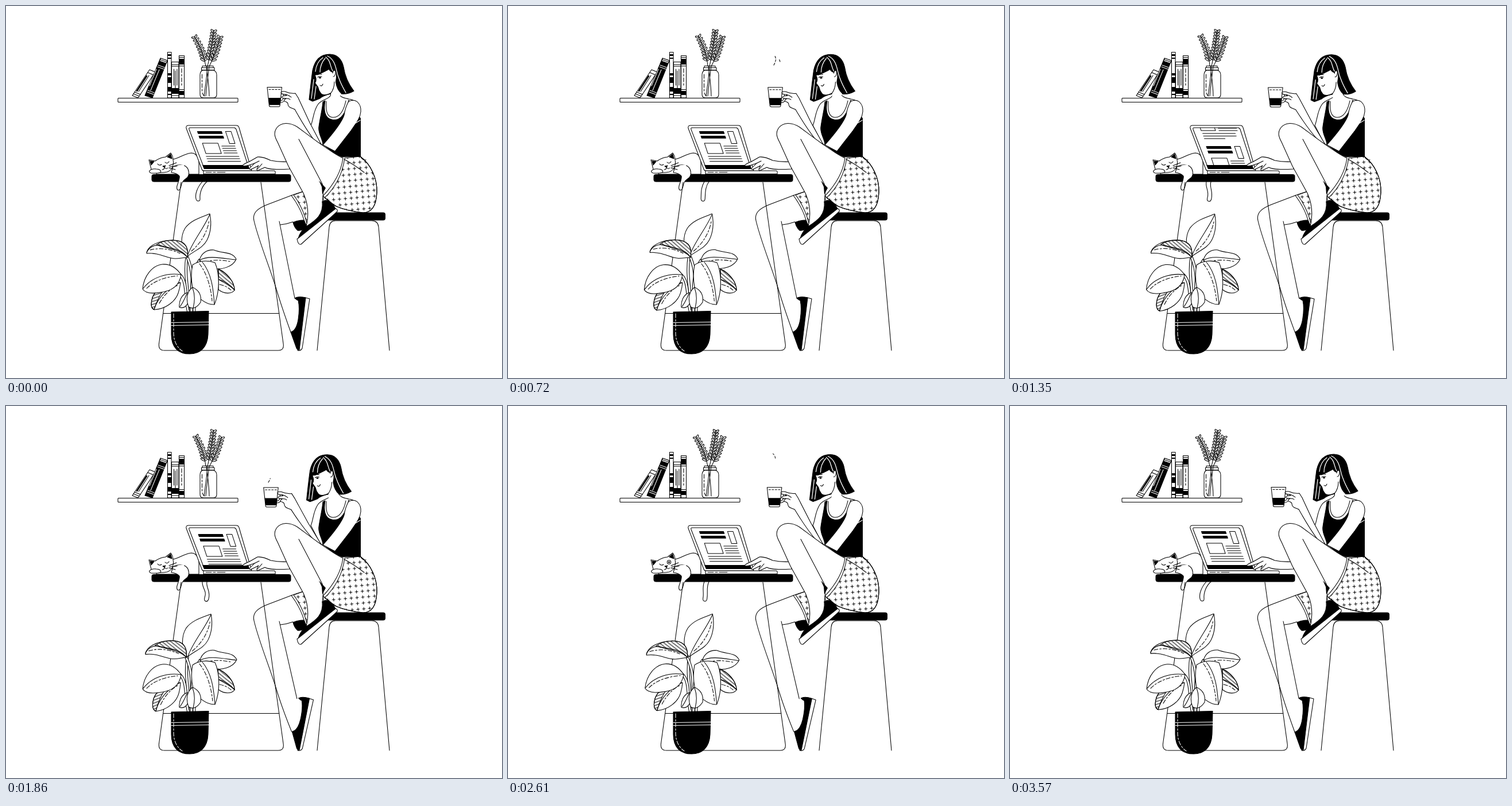
Write an HTML page that moves like this. It is 864 px wide and 648 px high and loops after 3.6 s.

```html
<!DOCTYPE html>
<html lang="en">
<head>
<meta charset="utf-8">
<title>At the desk</title>
<style>
html, body { margin: 0; width: 100%; height: 100%; overflow: hidden; background: #fff; }
svg { display: block; width: 864px; height: 648px; fill: none; stroke: #000; stroke-width: 1.05; stroke-linecap: round; stroke-linejoin: round; }
.w { fill: #fff; }
.k { fill: #000; }
.b { fill: #000; stroke: none; }
.wl { stroke: #fff; }
.dash { stroke-dasharray: 7 3 3 3; }
</style>
</head>
<body>
<svg viewBox="0 0 864 648">
<defs>
  <pattern id="plus" width="10.2" height="10.2" patternUnits="userSpaceOnUse" patternTransform="translate(4 3) rotate(-5)">
    <path d="M2.700 5.100h4.800M5.100 2.700v4.800"/>
  </pattern>
  <pattern id="hatch" width="4.8" height="4.8" patternUnits="userSpaceOnUse" patternTransform="rotate(-50)">
    <path d="M2 0v4.800" stroke-linecap="butt"/>
  </pattern>
  <pattern id="hatchDown" width="4.8" height="4.8" patternUnits="userSpaceOnUse" patternTransform="rotate(-50)">
    <path d="M2 0v4.800" stroke-linecap="butt"/>
  </pattern>
  <pattern id="hatchFlat" width="4.8" height="4.8" patternUnits="userSpaceOnUse" patternTransform="rotate(72)">
    <path d="M2 0v4.800" stroke-linecap="butt"/>
  </pattern>
  <clipPath id="screen"><path d="M319 212H399L421 277H342Z"/></clipPath>
</defs>

<!-- shelf and books -->
<rect class="w" x="195" y="160.500" width="209" height="7" rx="1"/>
<path class="w" d="M250 111L260 115 230 160 220 156Z"/>
<path d="M247 116L257 120M224 150L234 154M222 153L232 157M249 121L231 149"/>
<path d="M245 122L228 148" stroke-width="2.400"/>
<path class="k" d="M269 91L281 95 255 160 242 156Z"/>
<path class="w" d="M269.500 91L281 95 279 100 267.500 96Z"/>
<path d="M268.500 93.500L280 97.500"/>
<path class="wl" d="M265 103L276 107M264 106L275 110M267 111L252 147M262 110L250 139M247 147L258 151M246 150L257 154"/>
<rect class="w" x="281.500" y="80.500" width="6.500" height="79.500"/>
<path class="b" d="M281.500 84h6.500v3h-6.500zM281.500 90h6.500v2h-6.500zM281.500 117h6.500v4h-6.500zM281.500 124h6.500v10h-6.500zM281.500 141h6.500v8h-6.500zM281.500 153h6.500v2h-6.500z"/>
<rect class="w" x="288.500" y="97.500" width="12.500" height="62.500"/>
<path d="M289 102H301M289 105H301M292.500 110V138M295 113V143M298 110V138M289 156H301"/>
<path class="b" d="M289 143h12v10h-12z"/>
<rect class="w" x="301.500" y="86.500" width="9" height="73.500"/>
<path class="b" d="M301.500 92h9v10h-9zM301.500 148h9v7h-9z"/>
<path d="M301.500 89.500h9M301.500 104.500h9M301.500 145.500h9"/>
<path class="dash" d="M306 109V141"/>

<!-- jar with twigs -->
<path class="w" d="M342 112C339 114 338 117 338 120V154Q338 160 344 160H361Q367 160 367 154V120C367 116 366 114 362 112Z"/>
<path class="w" d="M342 104.500H361V107.500H342ZM340.500 107.500H363V111.500H340.500Z"/>
<path class="dash" d="M341.500 119V148Q342 155 346 157"/>
<path d="M349 104C351 122 354 140 354 157M351 104C350 122 347 142 345 157M354 104C352 122 349 142 348 157"/>
<g id="twigs"></g>

<!-- cat -->
<path class="w" d="M291 267C302 265 311 257 323 256Q332 256 336 268V293H262V286Z"/>
<path id="tail" class="w"/>
<rect class="b" x="253.500" y="293" width="243" height="13.500" rx="4"/>
<path class="w" d="M291 280C298 276 312 274 317 284C320 292 318 298 313 301C307 305 306 309 305 314C304 319 303 321 300 321C297 320 297 315 299 310C301 305 303 300 302 296Q297 291 288 290Z"/>
<path d="M294 281Q304 277 309 278" stroke="#fff" stroke-width="2.500"/>
<path class="w" d="M253 284C251 277 250 273 249 268L260 270Q268 264 278 263L287 256Q291 261 291 268C293 278 289 286 281 289Q266 292 255 288Z"/>
<path class="k" d="M251 270L258 271 253 277ZM281 263L287 258 289 266Z"/>
<path class="w" d="M262 284C268 284 271 287 269 290Q263 292 253 291Q249 290 250 287Q253 283 262 284Z"/>
<path class="k" d="M273 279L278 278 276 281Z"/>
<path d="M276 281Q276 285 272 285M276 281Q279 285 282 282M284 278L297 273M285 280L298 279M284 282L295 285M264 275Q267 279 271 276"/>
<path id="shut" d="M277 272Q281 276 284 271"/>
<g id="open"><circle class="w" cx="280.500" cy="272" r="3.200"/><circle class="b" cx="280.500" cy="272" r="1.600"/></g>

<!-- laptop -->
<path class="w" d="M318 208H401Q405 208 406 212L428 287H344Q342 287 341 284L314 213Q313 208 318 208Z"/>
<path class="w" d="M321 212H397Q400 212 401 215L423 282H345L319 215Q318 212 321 212Z"/>
<g clip-path="url(#screen)"><g transform="translate(-68.640 0) skewX(18.263)"><g id="page"></g></g></g>
<path class="b" d="M342 277H422L424 284H345Z"/>
<path class="w" d="M344 287H467Q469 287 469 289V292.500H344Z"/>
<path d="M348 289.700h10M361 289.700h4M368 289.700h14"/>

<!-- stool -->
<path d="M542 600L563 385Q564 374 574 374H637Q648 374 649 385L668 600"/>
<path class="b" d="M570 359.500H657Q661 359.500 661 363.500V369.500Q661 373.500 657 373.500H555Z"/>

<!-- torso and arms -->
<path class="w" d="M566 153C565 163 549 162 543 172C535 184 535 200 531 208L548 241H580L617 185C617 170 609 164 597 162C588 160 580 159 578 148Z"/>
<path id="forearm" class="w"/>
<path class="k" d="M552 167L556 165C553 181 555 196 568 198C583 201 592 186 597 164L617.500 196V263C605 270 593 266 574 258L552 241C551 230 543 222 545 210C547 195 551 180 552 167Z"/>
<path d="M558 166C557 180 558 193 569 194C582 195 589 180 592 165"/>
<path class="w" d="M597 166C611 160 619 172 618 184C617 196 609 205 601 217L573 253 552 242C567 225 585 203 589 190Q591 176 597 166Z"/>
<path class="wl" d="M609 204L617 199"/>
<path class="w" d="M494 271C480 272 470 271 461 269Q447 262 438 263L424 271Q414 275 412 278Q415 280 427 276L433 274 424 283Q424 286 428 284L440 278Q435 285 438 287L451 281Q458 286 494 284Z"/>
<path d="M446 275L438 284M441 270L433 274"/>
<g id="hand">
  <path class="w" d="M479 150H484Q488 151 487 158C486 165 483 169 477 168M479 153H482Q484 153 484 158C483 163 481 165 478 165"/>
  <path class="w" d="M455 141.500H480.500L477 174Q477 175.500 475 175.500H461Q459 175.500 458.500 174Z"/>
  <path d="M458 145.500H478" stroke-dasharray="3 2.500"/>
  <path class="b" d="M457 160H479L477.500 172.500H458.500Z"/>
  <path class="w" d="M509 160L504 152Q495 153 486 149Q480 148 479 151Q480 154 487 154L489 156Q481 156 480 159Q481 161 488 161Q483 164 485 166Q490 167 491 170Q491 176 498 178L503 180"/>
  <path d="M487 154Q494 156 497 159M488 161Q493 161 495 163"/>
</g>
<path id="steam"/>

<!-- head -->
<g id="head">
  <path class="k" d="M564 84C577 84 585 93 588 106C591 126 599 139 606 148Q596 154 584 153L566 153Q552 156 547 161Q540 164 534 166L528 163C530 144 532 127 534 112C538 94 547 84 564 84Z"/>
  <path class="w" stroke="none" d="M538 119Q556 116 565 109L573 112C577 122 574 128 574 133Q576 146 584 153L580 159H566L566 151C560 154 553 156 549 152Q545 147 544 141L539 134Q543 128 538 119Z"/>
  <path d="M565 153C569 148 572 140 572 132"/>
  <path class="b" d="M536 116C541 99 552 89 562 91C565 98 569 106 573 113L570 116Q564 115 562 110Q552 118 538 121Z"/>
  <path class="w" d="M569 117C570 110 575 111 574 117Q573 123 570 123"/>
  <path class="wl" stroke-width="1.300" d="M552 90C543 96 540 104 539 114M556 91C549 99 547 107 547 115M557 89C566 96 564 104 569 113M560 87C576 95 574 113 580 126C583 135 588 144 592 151M536 128L532 161M540 140L537 162"/>
  <path d="M543 124Q546 122 550 123M542 120Q546 118 550 119M547 138Q550 141 552 136"/>
  <ellipse class="b" cx="547" cy="125" rx="2" ry="1.300"/>
</g>

<!-- far leg -->
<path id="farLeg"/>
<g id="farShoe">
  <path class="w" d="M521 508L529 510 516 596Q514 601 508 600Z"/>
  <path class="k" d="M503 509Q509 505 522 508L511 599Q508 600 506 596L496 568Q506 565 509 546Q512 526 509 513Q506 512 503 509Z"/>
</g>
<path class="w" d="M497 330L518 323 528 346 527 374 522 384Q516 355 497 330Z"/>
<path fill="url(#plus)" d="M501 329L518 323 528 346 527 374 524 378Q517 351 501 329Z"/>
<path class="k" d="M500 377Q509 373 519 373L524 384Q518 392 508 391Q502 386 500 377Z"/>
<path d="M305 307L266.500 588Q265 600 276 600H474Q485 600 483 588L444 307M274 535.500H476"/>

<!-- shorts and near leg -->
<path class="b" d="M546 302L560 315 552 329Q542 325 540 314Z"/>
<path class="w" d="M584 263L617 262C636 276 647 301 646 325C645 347 638 360 622 360Q593 357 573 348L552 331C569 313 580 293 584 263Z"/>
<path fill="url(#plus)" d="M590 265L617 262C636 276 647 301 646 325C645 347 638 360 622 360Q593 357 573 348L555 334C575 315 586 293 590 265Z"/>
<path d="M589 267Q606 276 624 290M617 262Q622 270 627 268"/>
<path class="w" d="M587 265C565 255 527 225 508 211C494 202 479 202 471 213C466 221 468 228 473 237L492 279 518 326C526 344 528 364 523 384L534 388 556 353 552 331C571 311 584 288 587 265Z"/>
<path d="M510 232L551 310Q554 322 551 342"/>
<path class="b" d="M545 304L557 317 551 328 550 315Z"/>
<path class="k" d="M551 341C558 335 567 340 574 353L509 405Q512 393 523 384C540 373 553 364 551 341Z"/>
<path class="w" d="M507 406L574 353Q578 354 577 358L514 415Q509 417 507 406Z"/>

<g id="plant"></g>
<path class="k" d="M288 533L353 531.500 352 572C351 595 338 606 320 606C301 606 288 596 288 572Z"/>
<path class="wl" d="M288 551.500L353 550.500M288 556.500L353 555.500"/>
<path class="wl dash" d="M292 536V571Q293 591 307 601"/>
</svg>

<script>
const LOOP = 3600;
const $ = id => document.getElementById(id);
const set = (id, name, value) => $(id).setAttribute(name, value);
const clamp = v => Math.min(1, Math.max(0, v));
const ease = v => (1 - Math.cos(Math.PI * clamp(v))) / 2;

// Each twig: foot x, tip x, tip y, bend, leaf pairs, sway in degrees, phase
const twigs = [
  [348, 328, 53, 3, 8, 2.8, 118],
  [351, 362, 42, 1, 10, .6, 290],
  [354, 373, 53, 2, 8, 1.4, 200]
];

function twig([x0, x1, y1, bend, n], i) {
  const at = u => [x0 + (x1 - x0) * u + bend * Math.sin(Math.PI * u), 105 + (y1 - 105) * u];
  const pts = Array.from({ length: 13 }, (_, j) => at(j / 12).map(v => v.toFixed(1)).join(' '));
  let out = `<path d="M${pts.join('L')}"/>`;
  for (let j = 0; j < n; j++) {
    const u = .18 + .76 * j / (n - 1), [x, y] = at(u), [ax, ay] = at(u + .02);
    const dir = Math.atan2(ay - y, ax - x) * 180 / Math.PI;
    const r = 4.4 - 1.2 * u;
    for (const side of [-48, 48])
      out += `<ellipse class="w" cx="${r}" rx="${r}" ry="1.5" transform="translate(${x} ${y}) rotate(${dir + side})"/>`;
  }
  return `<g id="twig${i}">${out}</g>`;
}
$('twigs').innerHTML = twigs.map(twig).join('');

// Each leaf: pivot, sway in degrees, phase, outline, hatched area, pattern, rib, dashed rib, stem
const leaves = [
  [320, 534, .35, 190,
    'M315 437C303 425 304 400 312 387C322 373 340 368 355 362C358 377 357 394 350 408C343 422 326 427 315 437Z', '', '',
    'M316 435C325 410 343 390 355 363', 'M323 427C338 414 350 397 354 373', 'M315 437C310 470 319 500 319 534'],
  [320, 534, 1.7, 72,
    'M245 431C246 418 266 408 290 408C309 408 319 417 316 438C308 438 304 440 295 440C280 440 268 429 245 431Z',
    'M262 416C270 410 280 408 290 408C309 408 319 417 316 438C307 426 287 424 262 416Z', 'hatchDown',
    'M245 429Q254 413 272 418C291 423 308 424 316 438', 'M251 425C270 420 288 424 303 431', 'M316 438C330 470 322 500 321 534'],
  [320, 534, .8, 252,
    'M337 443C340 430 351 424 362 425C379 432 394 427 401 441C395 455 375 460 360 457Q347 452 337 443Z', '', '',
    'M337 443C352 434 374 439 400 442', 'M346 446Q365 440 390 445', 'M337 443C320 468 324 500 323 534'],
  [370, 490, .7, 40,
    'M370 458C385 465 398 480 398 495C393 502 380 502 370 494Z',
    'M370 458C385 465 398 480 398 495C390 486 379 482 370 476Z', 'hatch',
    'M370 476Q389 482 398 495', 'M372 485Q385 488 392 495'],
  [304, 482, -1.8, 180,
    'M304 482C285 480 262 490 255 508C252 518 252 526 258 529C278 528 295 515 300 500Q303 491 304 482Z',
    'M283 485C268 489 258 499 255 508C252 518 252 526 258 529C262 515 268 500 283 485Z', 'hatchFlat',
    'M258 528C265 508 281 491 303 482', 'M267 518C276 502 287 492 300 486'],
  [320, 534, 1, 270,
    'M305 468C296 455 284 449 272 450C255 452 240 470 238 493C243 501 256 501 268 499C287 497 302 488 305 468Z', '', '',
    'M239 492C253 473 280 464 305 468', 'M245 492C257 479 278 472 299 470', 'M303 468C317 481 311 510 318 534'],
  [342, 447, -.4, 180,
    'M325 451C335 444 350 442 364 447C372 465 373 496 363 520C350 521 330 508 325 490Q321 470 325 451Z', '', '',
    'M342 446C358 466 361 491 363 520', 'M337 449C350 466 357 490 359 514'],
  [316, 500, 0, 0, 'M316 499C305 503 301 515 302 525Q312 528 317 517Z', '', '', 'M315 501Q310 514 303 524', ''],
  [325, 490, 0, 0, 'M325 490C315 497 313 511 318 524Q329 531 339 516C341 502 334 494 325 490Z', '', '',
    'M325 491Q331 507 326 526', '', 'M331 516Q327 524 328 534']
];

const stem = d => d ? `<path d="${d}" stroke-width="5"/><path d="${d}" class="wl" stroke-width="2.9"/>` : '';
$('plant').innerHTML = leaves.map(([, , , , edge, area, pattern, rib, dashes, stalk], i) =>
  `<g id="leaf${i}">${stem(stalk)}<path class="w" d="${edge}"/>` +
  (area ? `<path d="${area}" fill="url(#${pattern})"/>` : '') +
  `<path d="${rib}"/><path class="dash" d="${dashes}"/></g>`).join('');

const line = (x, y, w) => `<path d="M${x} ${y}h${w}"/>`;
const box = (x, y, w, h, cls = '') => `<rect class="${cls}" x="${x}" y="${y}" width="${w}" height="${h}"/>`;
$('page').innerHTML =
  box(330, 169, 25, 22) + box(330, 218.5, 42, 3.8, 'k') + box(330, 226.5, 42, 3.8, 'k') +
  box(332, 239, 27, 18) + box(379, 218.5, 9.5, 21) +
  [183, 187, 191].map(y => line(361, y, 32)).join('') +
  [196, 200.5, 205].map(y => line(331, y, y > 204 ? 36 : 57)).join('') +
  [244, 248, 252, 256].map(y => line(364, y, 23)).join('') +
  [262, 266, 270.5].map(y => line(331, y, 57)).join('');

// Blend two poses given as one path template with number lists
function pose(a, b, k) {
  const to = b.match(/[\d.]+/g);
  let i = 0;
  return a.replace(/[\d.]+/g, v => (+v + (to[i++] - v) * k).toFixed(2));
}

// Wisps: start time, foot x, tip x, height, wave
const wisps = [
  [210, 464, 464, 46, 2.5], [150, 474, 471, 41, 2.5],
  [1815, 457, 454, 53, 4], [2050, 472, 460, 50, 4]
];
function wisp(t, [start, x0, x1, h, wave]) {
  const head = clamp((t - start) / 350), tail = clamp((t - start - 200) / 480);
  let d = '';
  for (let y = Math.ceil(tail * h / 6) * 6; y < head * h; y += 6) {
    const at = v => `${(x0 + (x1 - x0) * v / h + wave * Math.sin(v / h * 9)).toFixed(1)} ${(133 - v).toFixed(1)}`;
    d += `M${at(y)}L${at(Math.min(y + 3.5, head * h))}`;
  }
  return d;
}

function draw(now) {
  const t = now % LOOP, turn = t / LOOP * 2 * Math.PI;
  const wave = deg => Math.cos(turn - deg * Math.PI / 180);
  const k = (1 - Math.cos(turn)) / 2;
  const foot = t < 2300 ? ease((t - 1090) / 1130) : 1 - ease((t - 2300) / 1250);
  const scroll = t < 1450 ? ease((t - 850) / 480) : 1 - ease((t - 1450) / 580);
  const awake = t > 2130 && t < 3210;

  // Swing away from the pose at the start of the loop
  const swing = (deg, phase) => deg * (wave(phase) - Math.cos(phase * Math.PI / 180));
  twigs.forEach(([, , , , , deg, phase], i) => set('twig' + i, 'transform', `rotate(${swing(deg, phase)} 351 108)`));
  leaves.forEach(([x, y, deg, phase], i) => set('leaf' + i, 'transform', `rotate(${swing(deg, phase)} ${x} ${y})`));

  set('tail', 'd', pose('M342 306C333 316 329 328 331 336C332 341 338 341 338 336C337 326 341 314 350 306',
    'M342 306C341 317 351 322 346 334C344 341 351 343 353 336C357 322 348 317 350 306', k));
  set('head', 'transform', `translate(${-4.5 * k} ${.8 * k})`);
  set('hand', 'transform', `translate(${-6.3 * k} ${.6 * k})`);
  set('forearm', 'd', pose('M509 160L529 203 549 241 537 234Q522 214 503 180',
    'M502.7 160.6L527 205 549 241 537 234Q519 215 496.7 180.6', k));
  set('farLeg', 'd', pose('M497 330L455 346C437 353 429 361 432 374C439 405 458 452 470 490Q480 524 496 568M503 509L476 375M478 381Q489 380 500 376',
    'M497 330L455 346C437 353 429 361 432 374C439 405 458 452 470 490Q480 524 498 567M508 510L476 375M478 381Q489 380 500 376', foot));
  set('farShoe', 'transform', `rotate(${5.4 * foot} 508 600)`);
  set('page', 'transform', `translate(0 ${26 * scroll})`);
  set('shut', 'visibility', awake ? 'hidden' : 'visible');
  set('open', 'visibility', awake ? 'visible' : 'hidden');
  set('steam', 'd', wisps.map(w => wisp(t, w)).join('') || 'M0 0');
}

const begin = performance.now();
function tick() {
  draw(performance.now() - begin);
  requestAnimationFrame(tick);
}
tick();
</script>
</body>
</html>
```
